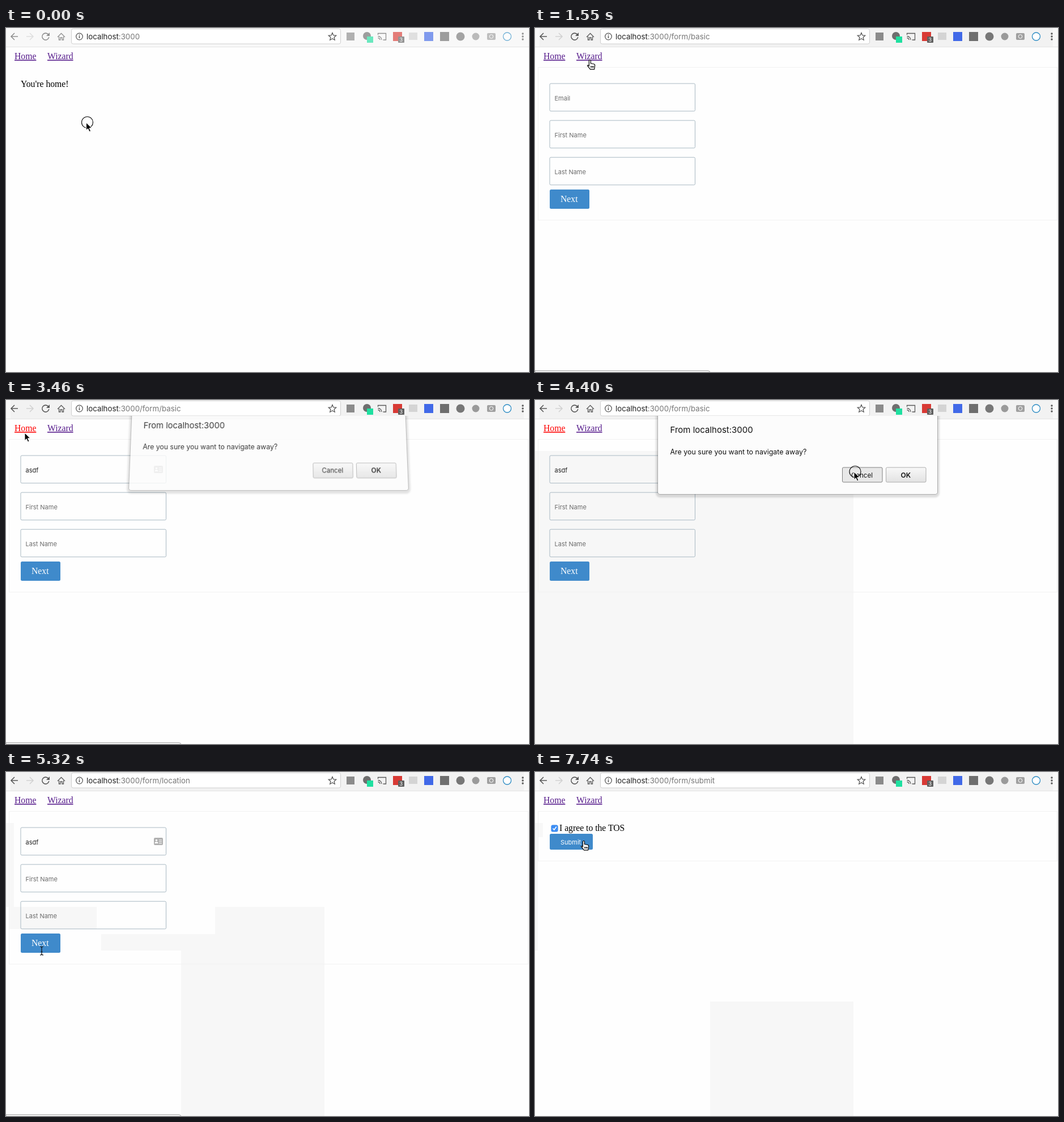
Animation of 923 by 607 pixels, one loop 8000 ms. Source, as an HTML page:

```html
<!DOCTYPE html>
<html lang="en">
<head>
<meta charset="utf-8">
<style>
  html, body { margin: 0; width: 100%; height: 100%; overflow: hidden; background: #fefefe; }
  svg { position: absolute; left: 0; top: 0; display: block; }
  text { font: 11px Inter, sans-serif; white-space: pre; }
  .serif { font: 15.7px "Liberation Serif", serif; }
  .link { fill: #551a8b; text-decoration: underline; }
  .url { font-size: 13.3px; }
  .line { fill: none; stroke: #5a5a5a; stroke-width: 1.6; }
  .field { fill: none; stroke: #a9b9c3; }
  .hint { fill: #6c6c6c; }
  .panel { fill: none; stroke: #f1f1f1; }
  .stale { fill: #f7f7f7; }
  #sheet { position: absolute; left: 0; top: 28px; width: 923px; height: 579px; overflow: hidden; }
  #dialog { position: absolute; left: 217px; top: 0; width: 493px; height: 138px;
    background: #fcfcfc; border-radius: 0 0 4px 4px; transform-origin: 50% 100%;
    box-shadow: 0 0 0 1px rgba(0,0,0,.22), 0 2px 3px 4px rgba(0,0,0,.13); }
  #dialog text { fill: #111; }
</style>
</head>
<body>
<svg id="page" width="923" height="607"></svg>
<div id="sheet"><div id="dialog"></div></div>
<svg id="pointer" width="923" height="607"></svg>
<script>
const $ = id => document.getElementById(id);
const LOOP = 8000;

// data-on holds the time spans in which an element is shown
const shown = (spans, body) => `<g data-on="${spans}">${body}</g>`;
const rect = (x, y, w, h, attrs = '') => `<rect x="${x}" y="${y}" width="${w}" height="${h}" ${attrs}/>`;
const circle = (x, y, r, attrs = '') => `<circle cx="${x}" cy="${y}" r="${r}" ${attrs}/>`;
const path = (d, attrs = '') => `<path d="${d}" ${attrs}/>`;
const text = (x, y, s, attrs = '') => `<text x="${x}" y="${y}" ${attrs}>${s}</text>`;

const field = (label, row) => rect(26, 98 + 65.1 * row, 256.5, 48.7, 'rx="2" class="field"') +
  (label ? text(34.5, 127.5 + 65.1 * row, label, 'class="hint"') : '');
const panel = bottom => rect(5.5, 69.5, 916, bottom - 69.5, 'class="panel"');
const button = (y, w, h) => rect(26, y, w, h, 'rx="2.5" fill="#3f8acb"');
const nextButton = y => button(y, 70, 34) + text(45, y + 22, 'Next', 'class="serif" fill="#fff"');
const address = (spans, route) => shown(spans,
  text(142, 20, `localhost<tspan fill="#777">:3000${route}</tspan>`, 'class="url" fill="#222"'));

const contactCard = rect(261, 116, 16, 13, 'rx="2" fill="#b0b0b0"') +
  circle(265.5, 120.5, 1.7, 'fill="#fff"') + path('M262.5 126q0-3 3-3t3 3z', 'fill="#fff"') +
  path('M270 120h5M270 123h5M270 126h5', 'stroke="#fff"');

const toolbarIcons =
  path('M21 15H9M15 9l-6 6 6 6', 'class="line"') +
  path('M36 15h12M42 9l6 6-6 6', 'class="line" style="stroke:#d2d2d2"') +
  path('M75 12a6 6 0 1 0 .8 4', 'class="line"') + path('M77 8v6h-6z', 'fill="#5a5a5a"') +
  path('M91 16l6.5-6.5 6.5 6.5M93.5 15v6h2.5v-4h3v4h2.5v-6', 'class="line" style="stroke-width:1.3"');

const extensions =
  rect(601, 8, 14, 14, 'fill="#8b8b8b"') +
  circle(637, 14, 7, 'fill="#6e6e6e"') + rect(637, 15, 11, 11, 'fill="#1ee0a0"') +
  path('M656.5 12V9.5h14V21h-5M656.5 14.5a6.5 6.5 0 0 1 6.5 6.5M656.5 17.5a3.5 3.5 0 0 1 3.5 3.5', 'class="line" style="stroke-width:1.3"') +
  rect(683, 7, 16, 16, 'fill="#d83a35"') + rect(692, 15, 11, 11, 'rx="1" fill="#606060"') +
  text(694.5, 24, '3', 'fill="#fff" style="font-size:9px"') +
  rect(711, 8, 15, 13, 'fill="#d4d4d4"') +
  rect(738, 7, 16, 16, 'fill="#4169e8"') +
  rect(766, 7, 16, 16, 'fill="#6e6e6e"') +
  circle(802, 15, 7.5, 'fill="#777"') +
  circle(829, 15, 6.5, 'fill="#9a9a9a"') +
  rect(849, 9, 15, 12, 'rx="2" fill="#a0a0a0"') + circle(856.5, 15, 3.3, 'fill="none" stroke="#fff"') +
  circle(884.5, 15, 7, 'fill="#fff" stroke="#2d8cc4" stroke-width="1.3"') +
  [10, 15, 20].map(y => circle(912, y, 1.7, 'fill="#5a5a5a"')).join('');

const toolbar =
  rect(0, 0, 923, 33, 'fill="#f8f8f8"') + shown('1080,8000', rect(8, 0, 906, 33, 'fill="#f2f2f2"')) +
  path('M0 33.5H923', 'stroke="#e4e4e4"') +
  rect(115.5, 1.5, 475, 26.5, 'rx="3" fill="#fff" stroke="#cfcfcf"') +
  `<g id="icons">${toolbarIcons}${extensions}</g>` +
  circle(129.5, 15, 5.8, 'class="line" style="stroke-width:1.3"') +
  path('M129.5 14v4M129.5 11.5v1.5', 'class="line"') +
  path('M576 8.5l1.9 4.4 4.8.4-3.6 3.2 1.1 4.7-4.2-2.5-4.2 2.5 1.1-4.7-3.6-3.2 4.8-.4z', 'class="line" style="stroke-width:1.3"') +
  address('0,1250', '') + address('1250,5320', '/form/basic') +
  address('5320,6420', '/form/location') + address('6420,8000', '/form/submit');

const stalePatches =
  shown('3950,4800', rect(0, 90, 562, 517, 'class="stale"')) +
  shown('4800,5380', path('M369 238H562V607H309V286H369ZM6 238H160V277H6ZM168 286H309V315H168ZM0 90H14V238H0Z', 'class="stale"')) +
  shown('5380,8000', path('M309 405H562V607H309ZM0 90H14V115H5V315H0Z', 'class="stale"'));

$('page').innerHTML = toolbar + stalePatches +
  text(15, 55, 'Home', 'id="home" class="serif link"') +
  text(73, 55, 'Wizard', 'id="wizard" class="serif link"') +
  shown('0,1250', text(26, 104, "You're home!", 'class="serif"')) +
  shown('1250,5380', panel(339) + field('', 0) + field('First Name', 1) + field('Last Name', 2) + nextButton(285)) +
  shown('1250,2420', text(34.5, 127.5, 'Email', 'class="hint"')) +
  shown('2420,5380', '<text id="typed" x="34.5" y="127.5" fill="#222"></text>') +
  shown('2320,5380', contactCard) +
  shown('5380,6540', panel(404) + ['Address', 'City', 'State', 'Zip'].map(field).join('') + nextButton(350)) +
  shown('6540,8000', panel(157) + rect(29, 94, 11, 11, 'rx="2.5" fill="#fff" stroke="#b9b9b9"') +
    text(43, 104, 'I agree to the TOS', 'class="serif"') +
    button(109, 76, 28) + text(45, 127.5, 'Submit', 'fill="#fff"')) +
  shown('7400,8000', rect(28.5, 93.5, 12, 12, 'rx="2.5" fill="#3b8df5"') +
    path('M31.5 99.5l2.3 2.5 4-5.5', 'fill="none" stroke="#fff" stroke-width="1.6"')) +
  shown('1000,1950 3080,3900 5000,5700 6180,6950',
    path('M0 604.5H305q4 0 4 4H0z', 'fill="#f4f4f4" stroke="#a8a8a8"'));

$('dialog').innerHTML = `<svg width="493" height="138" viewBox="217 28 493 138">
  <defs><linearGradient id="face" x2="0" y2="1"><stop stop-color="#f8f8f8"/><stop offset="1" stop-color="#e2e2e2"/></linearGradient></defs>` +
  text(238.5, 58, 'From localhost:3000', 'style="font-size:15px"') +
  text(238.5, 95.5, 'Are you sure you want to navigate away?', 'style="font-size:12.45px"') +
  rect(542.5, 119, 70.5, 26, 'id="cancel" rx="2" fill="url(#face)"') +
  text(558, 136.5, 'Cancel', 'style="font-size:11.6px"') +
  rect(619.5, 119, 70.5, 26, 'rx="2" fill="url(#face)" stroke="#adadad"') +
  text(645.5, 136.5, 'OK', 'style="font-size:12px;font-weight:600"') + '</svg>';

const shapes = {
  arrow: path('M0 0V13.5L3.2 10.6 5.6 16 8 15 5.6 9.7H10Z', 'fill="#000" stroke="#fff"'),
  hand: path('M-1.6 8.5V1a1.5 1.5 0 0 1 3 0V5.5l5.5 1q2 .5 1.8 2.5l-1 6.8H.5L-4.5 9.6q.3-2.2 2.9.3zM1.8 10v3M4 10v3M6 10v3', 'fill="#fff" stroke="#000" stroke-width="1.2"'),
  beam: path('M-3-7q3 0 3 2q0-2 3-2M0-5V6M-3 8q3 0 3-2q0 2 3 2M-1.5 2h3', 'fill="none" stroke="#111" stroke-width="1.2"')
};
$('pointer').innerHTML = '<g id="cursor">' +
  shown('0,50 1080,1250 2300,2420 3150,3300 4400,4560 5150,5290 6420,6540 7400,7500',
    circle(2, -.5, 10, 'fill="none" stroke="#111" stroke-width="1.2"')) +
  Object.keys(shapes).map(k => `<g id="${k}">${shapes[k]}</g>`).join('') + '</g>';

// each move: start, end, destination
const moves = [
  [470, 940, 97, 57], [1840, 2250, 118, 124], [2740, 3100, 33, 58], [3780, 4220, 563, 127],
  [4640, 5100, 63, 315], [5680, 6240, 67, 370], [6720, 7220, 37, 99], [7530, 7740, 86, 122]
];
// cursor shape from each time on
const looks = [
  [0, 'arrow'], [880, 'hand'], [1900, 'arrow'], [2080, 'beam'], [2880, 'arrow'], [3060, 'hand'],
  [3300, 'arrow'], [5020, 'hand'], [5320, 'beam'], [6050, 'hand'], [6540, 'arrow'], [7660, 'hand']
];

const clamp = v => Math.max(0, Math.min(1, v));
const ease = v => v * v * (3 - 2 * v);
const within = (t, a, b) => t >= a && t < b;

function cursorAt(t) {
  let x = 141.5, y = 167;
  for (const [start, end, toX, toY] of moves) {
    const p = ease(clamp((t - start) / (end - start)));
    x += (toX - x) * p;
    y += (toY - y) * p;
  }
  return [x, y];
}

const timed = [...document.querySelectorAll('[data-on]')].map(el =>
  [el, el.dataset.on.split(' ').map(span => span.split(',').map(Number))]);

function draw(t) {
  for (const [el, spans] of timed)
    el.style.display = spans.some(([a, b]) => within(t, a, b)) ? '' : 'none';

  $('icons').style.opacity = t < 1080 ? .65 : 1;
  $('home').style.fill = within(t, 3150, 4620) ? '#f00' : '';
  $('wizard').style.fill = within(t, 1080, 1250) ? '#f00' : '';
  $('typed').textContent = 'asdf'.slice(0, 1 + Math.max(0, Math.floor((t - 2420) / 65)));

  // the dialog tips forward into place from under the toolbar
  const open = clamp((t - 3330) / 220) * clamp((4680 - t) / 120);
  const tilt = 1 - open;
  const dialog = $('dialog').style;
  dialog.display = open > 0 ? '' : 'none';
  dialog.opacity = clamp(open * 1.4);
  dialog.transform = tilt
    ? `translateY(${-17 * tilt}px) scaleY(${1 + .08 * tilt}) perspective(500px) rotateX(${12 * tilt}deg)` : 'none';
  const pressed = within(t, 4400, 4560);
  $('cancel').style.fill = pressed ? '#e8e8e8' : '';
  $('cancel').style.stroke = pressed ? '#808080' : '#adadad';

  const look = looks.filter(([start]) => t >= start).pop()[1];
  for (const k in shapes) $(k).style.display = k === look ? '' : 'none';
  $('cursor').setAttribute('transform', `translate(${cursorAt(t)})`);
}

const began = performance.now();
function tick() {
  draw((performance.now() - began) % LOOP);
  requestAnimationFrame(tick);
}
tick();
</script>
</body>
</html>
```
